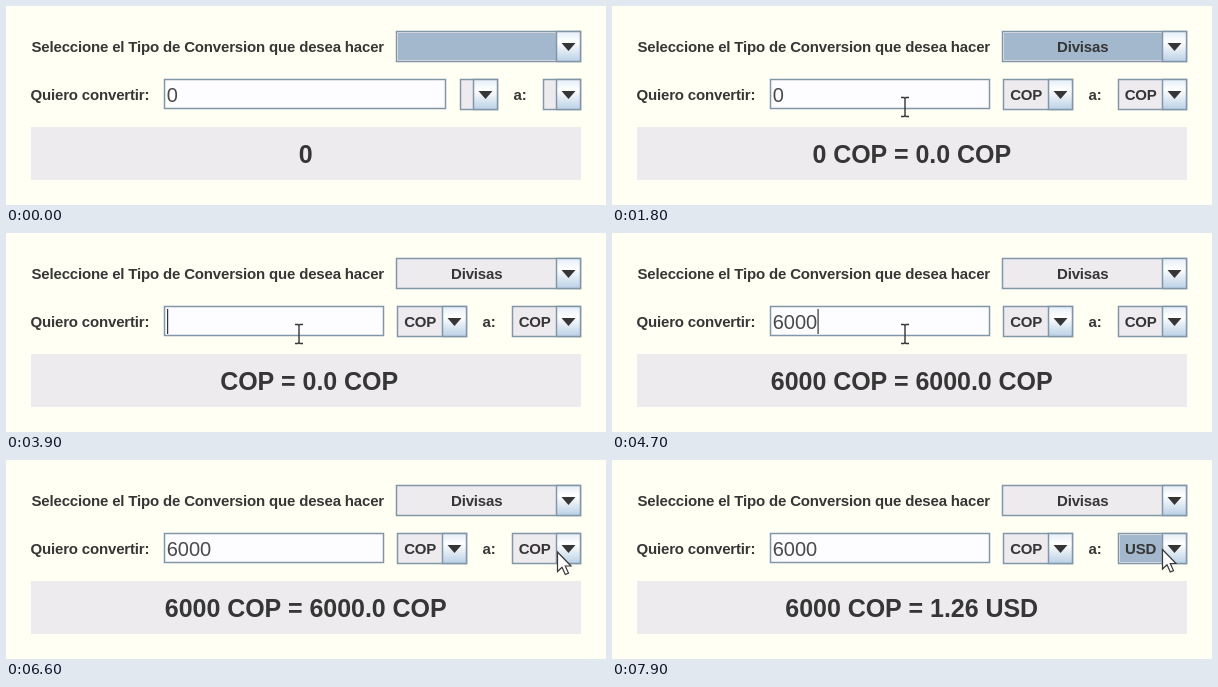
An HTML page with a canvas for the animation above (8000 ms loop, 600 by 199 pixels).

```html
<!DOCTYPE html>
<html lang="es">
<head>
<meta charset="utf-8">
<style>
html, body { margin: 0; overflow: hidden; background: #fffff4; }
canvas { display: block; }
</style>
</head>
<body>
<canvas id="stage" width="600" height="199"></canvas>
<script>
const ctx = document.getElementById('stage').getContext('2d');
const INK = '#363636', EDGE = '#8296a9', LIGHT = '#eeebee', FOCUS = '#a3b8cc';
const FAMILY = '"Liberation Sans", Arial, sans-serif';
const LOOP = 8000, STEP = 100;

// Pointer path: time, x, y
const path = [
  [100, 425, 190], [300, 446, 90], [500, 453, 42], [700, 453, 42], [900, 472, 64],
  [1200, 478, 68], [1700, 293, 101], [5500, 293, 101], [5800, 390, 172],
  [6000, 470, 160], [6300, 551, 91.5], [6700, 551, 91.5], [7100, 505, 160],
  [7500, 340, 150], [7600, 378, 134], [7800, 550, 89], [8000, 550, 89]
];

// Field contents: start time, text
const typed = [[0, '0'], [3500, ''], [4300, '6'], [4500, '60'], [4600, '600'], [4700, '6000']];

function pointerAt(t) {
  const i = Math.max(1, path.findIndex(p => p[0] > t));
  const [t0, x0, y0] = path[i - 1], [t1, x1, y1] = path[i];
  const k = Math.max(0, (t - t0) / (t1 - t0));
  return [x0 + (x1 - x0) * k, y0 + (y1 - y0) * k];
}

function rect(x, y, w, h, fill, stroke) {
  ctx.fillStyle = fill;
  ctx.fillRect(x, y, w, h);
  if (!stroke) return;
  ctx.strokeStyle = stroke;
  ctx.lineWidth = 1.5;
  ctx.strokeRect(x + .5, y + .5, w - 1, h - 1);
}

function text(str, x, y, { align = 'left', font = 'bold 15px', spacing = -.17, color = INK } = {}) {
  ctx.font = `${font} ${FAMILY}`;
  ctx.letterSpacing = `${spacing}px`;
  ctx.textAlign = align;
  ctx.fillStyle = color;
  ctx.fillText(str, x, y);
}

function polygon(points, fill) {
  ctx.beginPath();
  points.forEach(([x, y]) => ctx.lineTo(x, y));
  ctx.closePath();
  ctx.fillStyle = fill;
  ctx.fill();
}

function combo(x, y, w, label, focused) {
  const h = 31, split = x + w - 25, mid = split + 12.5;
  rect(x, y, w, h, LIGHT, EDGE);
  if (focused) rect(x + 2, y + 2, w - 27, h - 4, FOCUS);
  const shade = ctx.createLinearGradient(0, y, 0, y + h);
  shade.addColorStop(0, '#e3edf6');
  shade.addColorStop(.35, '#fff');
  shade.addColorStop(1, '#b8cfe5');
  rect(split, y, 25, h, shade, EDGE);
  polygon([[mid - 7, y + 12], [mid + 7, y + 12], [mid, y + 20]], INK);
  text(label, (x + split) / 2 + .7, y + 21, { align: 'center' });
}

function popup(hovered) {
  rect(390, 56, 185, 69, LIGHT, '#222');
  if (hovered) rect(392, 58, 181, 22, FOCUS);
  ['Divisas', 'Temperatura', 'Medidas'].forEach((s, i) =>
    text(s, 482.3, 74 + 22 * i, { align: 'center' }));
}

function field(t, width, value) {
  rect(158, 73, width, 30, '#fdfdff', EDGE);
  text(value, 160.7, 96, { font: '20px', spacing: 0, color: '#4a4a4a' });
  if (t < 2000 || t >= 6700) return;
  const lastEdit = Math.max(2000, ...typed.filter(e => e[0] <= t).map(e => e[0]));
  if (Math.floor((t - lastEdit) / 500) % 2) return;
  rect(161 + ctx.measureText(value).width, 76, 1.2, 25, INK);
}

function pointer(x, y, overField) {
  ctx.save();
  ctx.translate(x, y);
  ctx.strokeStyle = INK;
  if (overField) {
    ctx.lineWidth = 1.4;
    ctx.stroke(new Path2D('M-4-9.5H-1L0-8.5 1-9.5H4M0-8.5V8.5M-4 9.5H-1L0 8.5 1 9.5H4'));
  } else {
    const arrow = new Path2D('M.5.5V20L5 15.7 8.3 23 11.5 21.6 8.3 14.5H14Z');
    ctx.fillStyle = '#fff';
    ctx.lineWidth = 1.2;
    ctx.fill(arrow);
    ctx.stroke(arrow);
  }
  ctx.restore();
}

function draw(t) {
  const chosen = t >= 1200, converted = t >= 7200;
  const value = typed.filter(e => e[0] <= t).pop()[1];
  const unit = chosen ? 'COP' : '', target = converted ? 'USD' : unit;
  const fieldWidth = chosen ? 220 : 282;
  const amount = converted ? '1.26' : Number(value).toFixed(1);

  rect(0, 0, 600, 199, '#fffff4');
  text('Seleccione el Tipo de Conversion que desea hacer', 25.5, 45.5);
  combo(390, 25, 185, chosen ? 'Divisas' : '', t < 2000);
  text('Quiero convertir:', 24.5, 93.5);
  field(t, fieldWidth, value);
  combo(chosen ? 391 : 454, 73, chosen ? 70 : 38, unit, false);
  text('a:', chosen ? 476.5 : 507.5, 93.5);
  combo(chosen ? 506 : 537, 73, chosen ? 69 : 38, target, t >= 6700);
  rect(25, 121, 550, 53, '#edebee');
  text(chosen ? `${value} COP = ${amount} ${target}` : '0', 299.7, 157,
    { align: 'center', font: 'bold 25px', spacing: -.05 });
  if (t >= 500 && !chosen) popup(t >= 900);

  if (t < 100 || (t >= 7300 && t < 7600)) return;
  const [x, y] = pointerAt(t);
  pointer(x, y, x > 158 && x < 158 + fieldWidth && y > 73 && y < 103);
}

function frame() {
  draw(Math.floor(performance.now() % LOOP / STEP) * STEP);
  requestAnimationFrame(frame);
}
frame();
</script>
</body>
</html>
```
